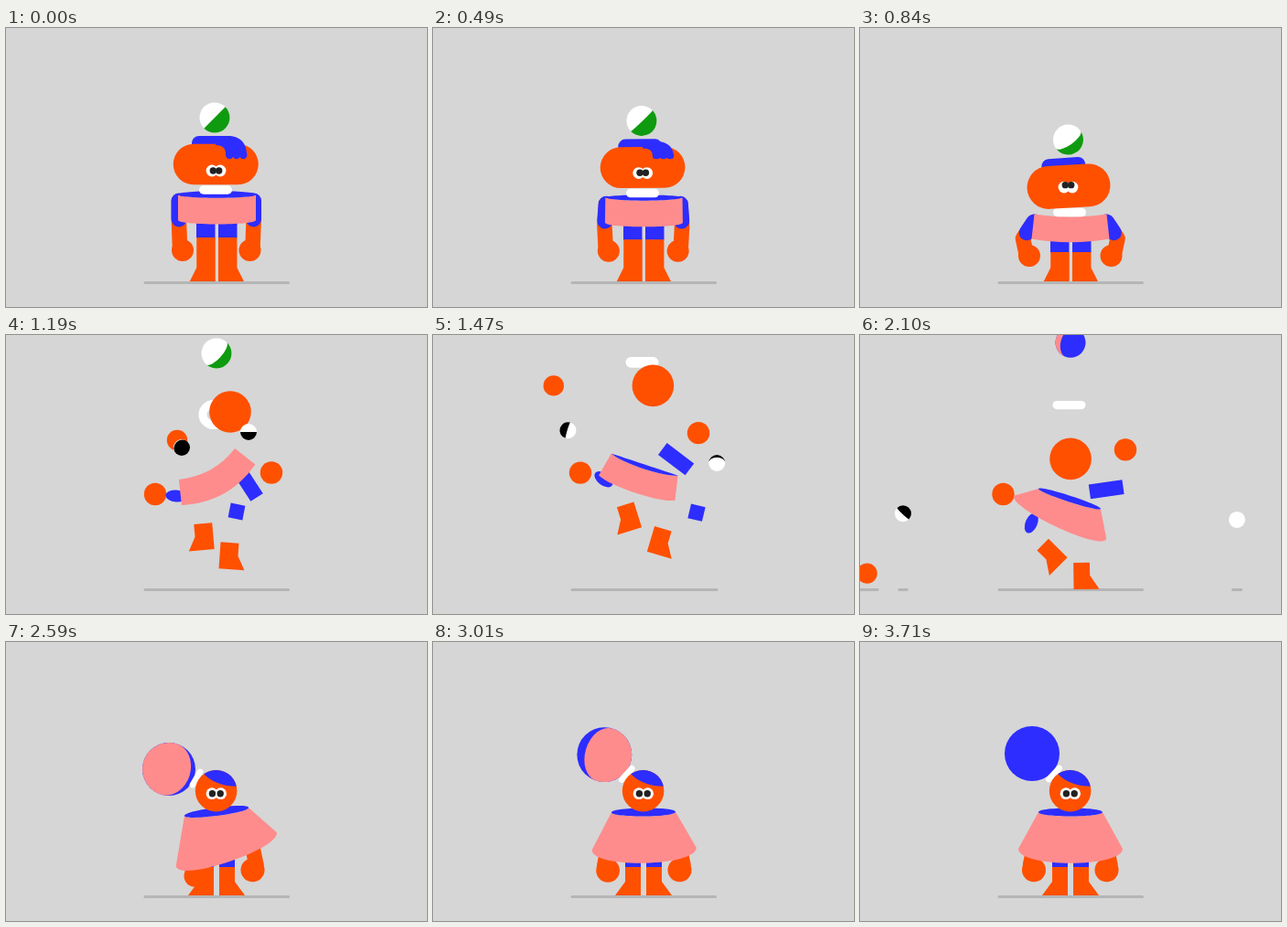
These frames come from a looping animation (460x305 px, 4.41 s). An HTML page with a canvas:

```html
<!DOCTYPE html>
<html lang="en">
<head>
<meta charset="utf-8">
<title>Jump and swap</title>
<style>
  html, body { margin: 0; width: 100%; height: 100%; overflow: hidden; background: #d6d6d6; }
  canvas { display: block; width: 460px; height: 305px; }
</style>
</head>
<body>
<canvas id="stage" width="460" height="305"></canvas>
<script>
const g = document.getElementById('stage').getContext('2d');
const ORANGE = '#ff5000', BLUE = '#2d2dff', PINK = '#ff8c8c', GREEN = '#0f9b0f';
const WHITE = '#fff', BLACK = '#000', PUPIL = '#222', GROUND = '#b5b5b5', BACK = '#d6d6d6';
const LOOP = 4410, STEP = 70, REST = 3710, BURST = 1120, LAND = 2310, FLOOR = 278, MIDDLE = 229.75;

const rad = d => d * Math.PI / 180;
const sin = d => Math.sin(rad(d)), cos = d => Math.cos(rad(d));
const clamp = v => Math.max(0, Math.min(1, v));
const ease = v => (v = clamp(v), v * v * (3 - 2 * v));
const mix = (a, b, k) => a.map((v, i) => v + (b[i] - v) * k);

// Drawing helpers
function paint(color, build) {
  g.beginPath();
  build();
  g.fillStyle = color;
  g.fill();
}
function local(x, y, deg, draw) {
  g.save();
  g.translate(x, y);
  g.rotate(rad(deg));
  draw();
  g.restore();
}
function mirrored(draw) {
  g.save();
  g.translate(2 * MIDDLE, 0);
  g.scale(-1, 1);
  draw();
  g.restore();
}
const dot = (color, x, y, r) => paint(color, () => g.arc(x, y, r, 0, 7));
const box = (color, x, y, w, h) => paint(color, () => g.rect(x, y, w, h));
function line(color, w, cap, ...p) {
  g.beginPath();
  for (let i = 0; i < p.length; i += 2) g.lineTo(p[i], p[i + 1]);
  g.strokeStyle = color;
  g.lineWidth = w;
  g.lineCap = cap;
  g.lineJoin = 'round';
  g.stroke();
}
// Two-coloured sphere; at turn 0 the second colour fills the half facing "deg", at 90 the front
function sphere(x, y, r, c1, c2, deg, turn) {
  const k = sin(turn);
  dot(c1, x, y, r);
  if (k < -0.97) return;
  local(x, y, cos(turn) < 0 ? deg + 180 : deg, () => paint(c2, () => {
    g.arc(0, 0, r, -Math.PI / 2, Math.PI / 2);
    g.ellipse(0, 0, Math.abs(k) * r, r, 0, Math.PI / 2, k < 0 ? -Math.PI / 2 : Math.PI * 1.5, k < 0);
  }));
}
function foot([x, y, deg], w, h, side) {
  local(x, y, deg, () => {
    g.scale(side, 1);
    const a = w / 2, b = h / 2;
    paint(ORANGE, () => [[-a, -b], [a, -b], [a, b], [a - 28, b], [-a, b - 15]].forEach(p => g.lineTo(...p)));
  });
}
// Half widths a and b, height h, bulges p and q; o = -1 shows the opening, 1 hides it
function garment([x, y, deg, tilt, a, b, h, p, q, o]) {
  const inset = (1 + o) / 6, i = 1 - 2 * inset;
  const bx = b * cos(tilt), by = b * sin(tilt), mx = -tilt / 2;
  const rim = () => {
    g.moveTo(-a, 0);
    g.bezierCurveTo(-a * i, p, a * i, p, a, 0);
  };
  local(x, y, deg, () => {
    paint(PINK, () => {
      rim();
      g.lineTo(mx + bx, h + by);
      g.bezierCurveTo(mx + bx * i, h + by * i + q, mx - bx * i, h - by * i + q, mx - bx, h - by);
    });
    if (o < 0.98) paint(BLUE, () => {
      rim();
      g.bezierCurveTo(a * i, p * o, -a * i, p * o, -a, 0);
    });
  });
}
function ring(x, y, deg, w, h) {
  local(x, y, deg, () => {
    g.beginPath();
    g.roundRect(-w / 2, -h / 2, w, h, h / 2);
    if (h > 19) {
      g.moveTo(w / 4, 0);
      g.ellipse(0, 0, w / 4, (h - 18) / 2, 0, 0, Math.PI * 2);
    }
    g.fillStyle = WHITE;
    g.fill('evenodd');
  });
}
function eyes(x, y, size, gap, near, look) {
  [-1, 1].forEach(s => dot(WHITE, x + s * gap, y, 6.4 * size));
  [-1, 1].forEach(s => dot(PUPIL, x + s * near, y + look, 3.7 * size));
}
function shorts(xs, y, w, h) {
  xs.forEach(x => box(BLUE, x, y, w, h));
}
function arm([sx, sy, ex, ey, wx, wy, hx, hy, r]) {
  line(ORANGE, 16.5, 'round', sx, sy, ex, ey, wx, wy);
  dot(ORANGE, hx, hy, r);
}

// First figure: stands, sinks into a crouch, jumps
const stand = {
  ball: [228, 98], hair: [227, 128, 0], head: [205, 149, 253.5, 149, 44.5], eyes: [229.5, 156],
  body: [230.5, 182, 0, 0, 42.5, 42.5, 28, 5, 6, -1],
  arm: [189, 189, 189, 214, 190, 240, 193, 243, 12]
};
const crouch = {
  ball: [227.5, 122], hair: [222.5, 152, -4], head: [206, 174.3, 250, 171.8, 47], eyes: [227.5, 174],
  body: [230, 203.5, 0, 0, 39.5, 42.5, 27, 4, 5, 1],
  arm: [190, 212, 178, 230, 181, 244, 185, 249, 12]
};
const sink = t => 0.15 * ease(t / 560) + 0.91 * ease((t - 560) / 330) - 1.06 * ease((t - 900) / 150);

function fringe(x, y, size) {
  if (size < 0.08) return;
  g.save();
  g.translate(x, y - 21);
  g.scale(1, size);
  paint(BLUE, () => {
    g.moveTo(0, -10);
    g.lineTo(15, -10);
    g.quadraticCurveTo(33, -9, 34, 11);
    g.lineTo(11, 11);
    g.quadraticCurveTo(11, 0, 0, 0);
  });
  for (let b = 15; b <= 30; b += 7.5) dot(BLUE, b, 11, 4.2);
  g.restore();
}
function figureA(t) {
  const c = sink(t), p = {};
  for (const k in stand) p[k] = mix(stand[k], crouch[k], c);
  p.body[9] = Math.min(1, p.body[9]);
  const h = 48 - 16 * c, hip = p.body[1] + 24;
  shorts([208, 232], hip, 20.5, FLOOR - 0.5 - h - hip);
  foot([218.5, 277 - h / 2, 0], 20.5, h, 1);
  foot([242.2, 277 - h / 2, 0], 20.5, h, -1);
  const limb = () => {
    arm(p.arm);
    const [sx, sy, ex, ey] = p.arm, k = 0.8 - 0.15 * c;
    line(BLUE, 17, 'round', sx, sy, sx + (ex - sx) * k, sy + (ey - sy) * k);
  };
  limb();
  mirrored(limb);
  garment(p.body);
  ring(229, p.body[1] - 5 + 3 * c, 0, 36, 9.5);
  local(...p.hair, () => paint(BLUE, () => g.roundRect(-24, -10, 48, 20, 8)));
  const [lx, ly, rx, ry, d] = p.head;
  line(ORANGE, d, 'round', lx, ly, rx, ry);
  fringe((lx + rx) / 2, (ly + ry) / 2, clamp(1 - 1.6 * c));
  eyes(...p.eyes, 1, 4.5, 3.2, -2.4 * c);
  sphere(...p.ball, 16.5, WHITE, GREEN, 45 + 10 * c, -21 * c);
}

// Loose parts: [x, y, angle] with speed and pull per step n, then drawn home
const part = (from, speed, pull) => ({ from, speed, pull });
const homing = n => ease((n - 13) / 3);
const fly = (p, n, home) =>
  mix(p.from.map((v, i) => v + p.speed[i] * n + p.pull[i] * n * n), home, homing(n));

const ball = part([230, 20, 0], [0, -32.1, 0], [0, 2.4, 0]);
const head = part([245, 84, 0], [-1.15, -12.1, 0], [0, 1.235, 0]);
const hoop = part([228.5, 87, 0], [0, -20.3, 0], [0, 1.5, 0]);
const handL = part([163, 174, 0], [-0.5, -8.45, 0], [0, 0.65, 0]);
const handR = part([290, 150.5, 0], [0, -14.8, 0], [0, 0.99, 0]);
const oval = part([186, 176, -86], [0.1, -7.6, 8.4], [0, 0.76, 0]);
const bar = part([264, 162, 57], [0.4, -9.75, -5], [0, 0.79, 0]);
const block = part([252, 193, 11], [13.4, 0.3, 0.6], [-1.1, 0, 0]);
const footL = part([216.5, 220.5, -5], [-0.5, -8.3, -3.1], [0, 0.75, 0]);
const footR = part([243.5, 241.5, 4], [1.4, -6.5, 4.7], [-0.115, 0.63, -0.39]);
const homeL = [218.5, 261.5, 0], homeR = [241.5, 261.5, 0], homeHead = [229.6, 162.7, 0];

// Second figure: swings and settles
const settled = {
  body: [230, 186, 0, 0, 35, 57, 40, 6, 21, -1],
  arm: [190, 225, 190, 225, 186, 244, 190, 249.3, 13],
  tie: [212, 144, -47], tail: [188, 122, 0]
};
const swung = {
  body: [230, 185.5, -7.3, -11, 35.3, 58, 42, 6, 19, -1],
  arm: [203, 238, 203, 238, 204, 254, 206, 256, 11.5],
  tie: [208, 149, -60], tail: [178, 139, 0]
};
function swing(t) {
  const u = t - 2590;
  return u < 0 ? Math.cos(u / 111) : Math.cos(u / 70) * Math.exp(-u / 160);
}
const sway = (name, s) => mix(settled[name], swung[name], s);

// The shirt turns through these poses while it becomes a skirt
const turns = [
  [-2, stand.body],
  [0, [219.5, 141, -29, 0, 35, 46, 26, 10, 15, 1]],
  [8, [243, 142, 65.5, 0, 41.7, 41.7, 28, 3, 0, -1]],
  [13, [229, 179, 18, 7, 35.7, 55.7, 22.4, 4.5, 15, -1]],
  [16, sway('body', swing(LAND))]
];
function tumble(n) {
  const i = turns.findIndex(([m]) => m > n), [a, from] = turns[i - 1], [b, to] = turns[i];
  return mix(from, to, ease((n - a) / (b - a)));
}
function loose(n) {
  const w = 20 - n / 6, h = 29 + 2 * homing(n), hip = [235, 225, 0];
  foot(fly(footL, n, homeL), w, h, 1);
  foot(fly(footR, n, homeR), w, h, -1);
  const [lx, ly] = fly(handL, n, [178, 243, 0]), [rx, ry] = fly(handR, n, [270, 243, 0]);
  dot(ORANGE, lx, ly, 12.2);
  dot(ORANGE, rx, ry, 12.2);
  local(...fly(oval, n, hip), () => paint(BLUE, () => g.ellipse(0, 0, 6.5, 11.5, 0, 0, 7)));
  local(...fly(bar, n, hip), () => box(BLUE, -18.5, -8, 37, 16));
  local(...fly(block, n, hip), () => box(BLUE, -8, -8, 16, 16));
  garment(tumble(n));
}

// Bouncing sphere with a contact shadow
function bounce(n, x, vx, y, vy, r, keep) {
  const pull = 2.9, floor = FLOOR - r;
  let u = n, y0 = y, v = vy;
  for (let i = 0; i < 4; i++) {
    const root = Math.sqrt(v * v + 4 * pull * (floor - y0)), hit = (root - v) / (2 * pull);
    if (u < hit) break;
    u -= hit;
    y0 = floor;
    v = -root * keep;
  }
  const px = x + vx * n, py = y0 + v * u + pull * u * u, half = r + 2 - (floor - py) / 13;
  if (half > 0) line(GROUND, 3, 'butt', px - half, 278.5, px + half, 278.5);
  return [px, py, r];
}
function runaways(n) {
  dot(ORANGE, ...bounce(n, 187, -13.8, 115, -26.5, 11.2, 0.7));
  sphere(...bounce(n, 192, -11.15, 123, -16.3, 9, 0.82), WHITE, BLACK, 45 - 7 * n, 64 - 59.9 * n);
  sphere(...bounce(n, 265, 11.3, 106, -3.1, 9, 0.64), WHITE, BLACK, 90, -33.75 * n);
}

function lowerB(s) {
  shorts([210, 233], 226, 17, 21);
  foot(homeL, 17, 31, 1);
  foot(homeR, 17, 31, -1);
  arm(sway('arm', s));
  mirrored(() => arm(settled.arm));
  garment(sway('body', s));
}
function faceB(x, y, t) {
  const off = 1 - clamp((t - LAND) / 210), pop = clamp((t - LAND + STEP) / 210);
  g.save();
  g.beginPath();
  g.arc(x, y, 22.8, 0, 7);
  g.clip();
  g.translate(x + 14 * off, y - 22 * off);
  paint(BLUE, () => {
    g.moveTo(-18, -24);
    g.quadraticCurveTo(-4, -4, 26, -5);
    g.lineTo(26, -30);
  });
  g.restore();
  eyes(x + 0.2, y + 3, pop, 4.8, 4.4, 0);
}

function draw(t) {
  g.fillStyle = BACK;
  g.fillRect(0, 0, 460, 305);
  line(GROUND, 3, 'round', 152, 278.5, 308.5, 278.5);
  if (t < BURST) return figureA(t);

  const n = (t - 1190) / STEP, k = homing(n), landed = t >= LAND;
  const s = swing(Math.max(t, LAND)), lag = Math.abs(s);
  if (landed) lowerB(s);
  else loose(n);

  const [bx, by] = fly(ball, n, sway('tail', lag)), r = 16.5 + (13.5 - lag) * k;
  if (t < 1600) sphere(bx, by, r, WHITE, GREEN, 42, -21);
  else sphere(bx, by, r, BLUE, PINK, 197, (t - 2306) * 0.1923);

  const depth = 9 + 23 * Math.abs(cos(20.8 * n));
  ring(...fly(hoop, n, sway('tie', lag)), 36 - 13 * k, depth + (6.5 - depth) * k);

  const [hx, hy] = fly(head, n, homeHead);
  dot(ORANGE, hx, hy, 22.8);
  if (landed) faceB(hx, hy, t);
  if (n < 20) runaways(n);
}

const start = performance.now();
function tick() {
  const t = (performance.now() - start) % LOOP;
  draw(Math.min(REST, Math.floor(t / STEP) * STEP));
  requestAnimationFrame(tick);
}
tick();
</script>
</body>
</html>
```
